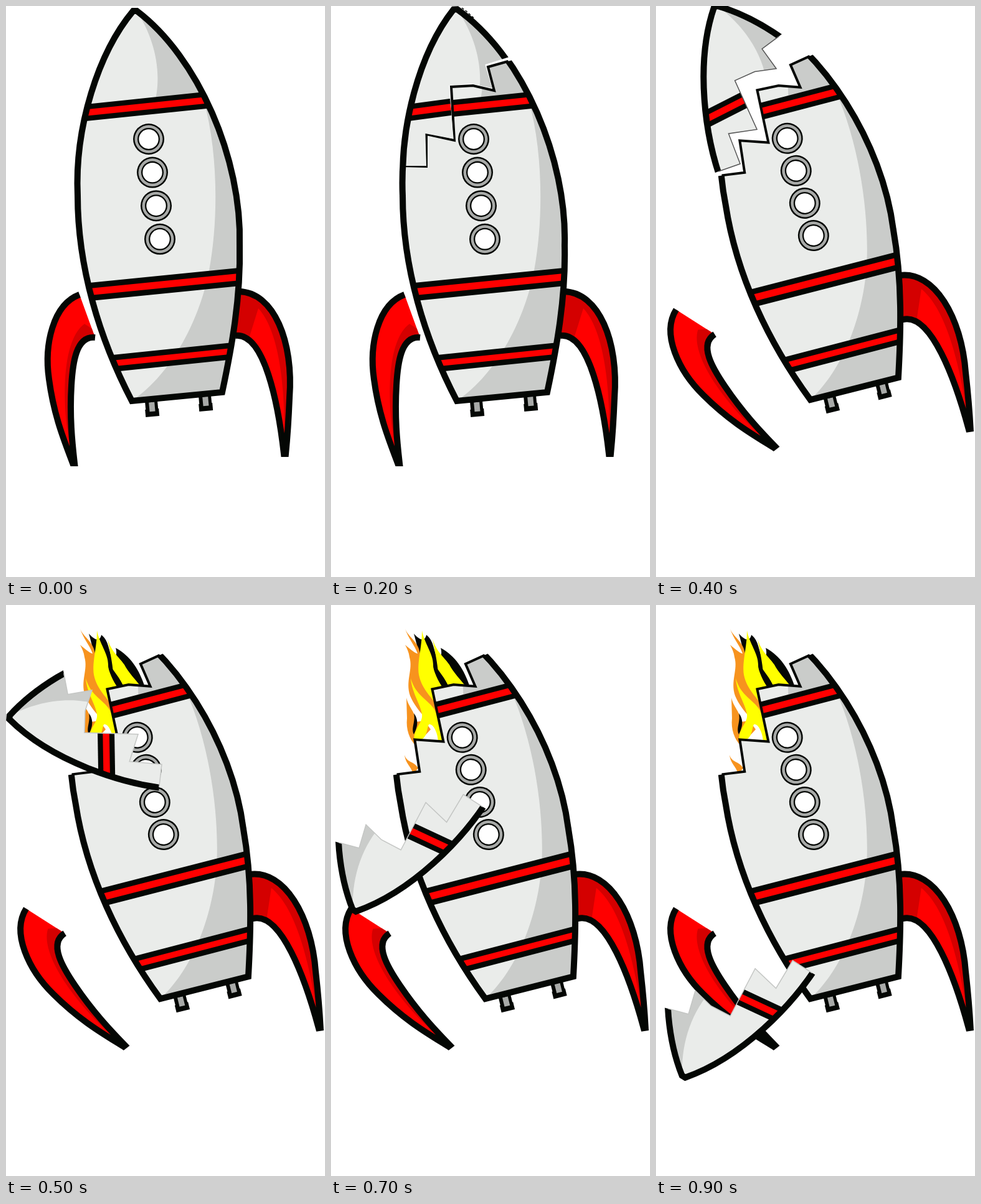
These frames come from a looping animation (512x918 px, 1000 ms). An HTML page with a canvas:

```html
<!DOCTYPE html>
<html lang="en">
<head>
<meta charset="utf-8">
<title>Rocket breaking apart</title>
<style>
html, body { margin: 0; width: 100%; height: 100%; overflow: hidden; background: #fff; }
canvas { display: block; width: 100vw; height: 100vh; }
</style>
</head>
<body>
<canvas id="stage" width="512" height="918"></canvas>
<script>
const ctx = document.getElementById('stage').getContext('2d');
const INK = '#040704', LIGHT = '#eaecea', SHADE = '#caccca';
const RED = '#ff0000', DARK_RED = '#d40000', GREY = '#a8aaa8';
const YELLOW = '#ffff00', ORANGE = '#f7931e';

const hull = new Path2D('M204 8C148 75 110 195 115 305C115 420 150 535 202 635L347 621C362 550 377 470 375 385C379 245 308 82 210 8Z');
const noseShade = new Path2D('M207 4C235 45 252 100 239 155L335 155L300 60Z');
const bodyShade = new Path2D('M317 150C342 240 340 350 326 425C312 500 268 590 203 634L347 622L400 520L400 300Z');

const rightFin = new Path2D('M374 459C430 460 462 540 455 630Q453 680 449 720L446 720C437 640 415 525 368 530');
const rightGlow = new Path2D('M405 486C436 520 448 600 447 700C430 610 415 550 391 531Z');
const leftFin = new Path2D('M118 464C75 480 61 545 69 600C77 660 94 700 107 735L110 735C106 700 102 660 105 610C107 575 112 530 143 533');
const leftShade = new Path2D('M140 520L126 511C92 535 88 625 102 704L110 700L110 560L143 533Z');

// Torn edge, right to left, shared by the nose and the body
const crack = [[291, 87], [252, 98], [262, 136], [228, 128], [193, 130], [198, 216], [153, 206], [153, 258], [116, 257]];
const tear = poly(crack);
const noseSide = poly([[340, 72], ...crack, [60, 257], [60, -40], [340, -40]]);
const bodySide = poly([[340, 72], ...crack, [60, 257], [60, 760], [500, 760], [500, 72]]);

const flames = [
  [INK, 'M133 46C147 62 152 54 153 48C166 58 164 74 172 88C178 82 178 76 176 69C200 82 214 104 223 132L190 150L160 110L143 84Z'],
  [ORANGE, 'M119 38C124 52 140 58 143 78C148 100 160 120 180 150L180 205C160 190 138 172 127 146C119 122 132 104 126 84C125 76 122 70 119 64C128 72 136 78 139 78C134 64 124 54 119 38Z'],
  [ORANGE, 'M121 149C124 164 136 172 136 188L150 186L160 200L136 226C126 216 120 200 122 182Z'],
  [ORANGE, 'M118 241C122 254 132 250 140 262L132 272C128 258 120 256 118 241Z'],
  [YELLOW, 'M146 41C150 62 164 78 164 96C164 112 178 122 182 136L176 170C166 152 146 138 141 112C138 90 146 70 146 41Z'],
  [YELLOW, 'M163 55C170 76 180 82 190 96C196 108 208 120 218 133L170 140C176 118 170 90 163 55Z'],
  [YELLOW, 'M134 220C130 200 148 190 146 176C144 160 130 142 128 118C136 146 156 152 166 168C174 184 181 200 181 222L172 222C172 206 164 190 157 192C152 204 156 216 134 220Z'],
  [INK, 'M164 92C172 106 184 118 190 134L180 134C172 122 164 108 164 92Z'],
  [INK, 'M133 174C142 186 138 198 133 208C128 198 136 188 133 174Z']
].map(([color, d]) => [color, new Path2D(d)]);

// Each pose is [degrees, x, y] with a fixed pivot per part
const PIVOT = { body: [238, 294.5], fin: [109, 738], nose: [119, 257] };
const bodyPose = [[0, 238, 294.5], [-2.1, 232.7, 295], [-8.7, 231.8, 291]];
const finPose = [[0, 109, 738], [-19.6, 154, 731], [-37.5, 192, 711]];
const nosePose = [
  [0, 119, 257], [0, 119, 257], [-1.7, 119, 257], [-15, 110, 260], [-21, 103, 265],
  [-85, 246, 290], [-149, 243, 221], [-149, 241, 323], [-149, 238, 445], [-149, 248, 590]
];

function poly(points) {
  const p = new Path2D();
  points.forEach(([x, y]) => p.lineTo(x, y));
  return p;
}

function fill(path, color) {
  ctx.fillStyle = color;
  ctx.fill(path);
}

function outline(path, color = INK, width = 10) {
  ctx.strokeStyle = color;
  ctx.lineWidth = width;
  ctx.stroke(path);
}

function part(name, [deg, x, y], draw) {
  const [px, py] = PIVOT[name];
  ctx.save();
  ctx.translate(x, y);
  ctx.rotate(deg * Math.PI / 180);
  ctx.translate(-px, -py);
  draw();
  ctx.restore();
}

function clipped(path, draw) {
  ctx.save();
  ctx.clip(path);
  draw();
  ctx.restore();
}

function band(x1, y1, x2, y2, height, core) {
  const line = poly([[x1, y1], [x2, y2]]);
  outline(line, INK, height);
  outline(line, RED, core);
}

function disc(x, y, r, color) {
  ctx.fillStyle = color;
  ctx.beginPath();
  ctx.arc(x, y, r, 0, Math.PI * 2);
  ctx.fill();
}

function porthole(x, y) {
  disc(x, y, 25, INK);
  disc(x, y, 22.5, GREY);
  disc(x, y, 18, INK);
  disc(x, y, 15.7, '#fff');
}

function nozzle(x, y) {
  ctx.save();
  ctx.translate(x, y);
  ctx.rotate(-0.09);
  ctx.fillStyle = INK;
  ctx.fillRect(-10, -12, 20, 18);
  ctx.fillRect(-11, 2, 22, 12);
  ctx.fillStyle = GREY;
  ctx.fillRect(-4, -9, 9, 15);
  ctx.restore();
}

function drawHull() {
  clipped(hull, () => {
    fill(hull, LIGHT);
    fill(noseShade, SHADE);
    fill(bodyShade, SHADE);
    band(120, 172.4, 335, 150, 27, 10.5);
    band(120, 461, 390, 434, 29, 11);
    band(160, 575.8, 375, 553.5, 27, 9.5);
  });
  outline(hull);
  for (let i = 0; i < 4; i++) porthole(229 + i * 6, 214 + i * 53.6);
}

function drawBase() {
  fill(rightFin, DARK_RED);
  fill(rightGlow, RED);
  outline(rightFin);
  nozzle(234, 646);
  nozzle(320, 637);
}

function drawFin() {
  fill(leftFin, RED);
  clipped(leftFin, () => fill(leftShade, DARK_RED));
  outline(leftFin);
}

function drawTear(color, width) {
  clipped(hull, () => outline(tear, color, width));
}

function render(step) {
  const stage = Math.max(0, Math.min(step, 4) - 2);
  const broken = step > 0;
  ctx.fillStyle = '#fff';
  ctx.fillRect(0, 0, 512, 918);

  if (step > 4) flames.forEach(([color, path]) => fill(path, color));
  part('fin', finPose[stage], drawFin);

  part('body', bodyPose[stage], () => {
    drawBase();
    if (!broken) return drawHull();
    clipped(bodySide, drawHull);
    drawTear(INK, 4);
  });

  if (broken) part('nose', nosePose[step], () => {
    clipped(noseSide, drawHull);
    if (step > 2) drawTear(step > 4 ? '#c4c6c4' : '#555', 1.5);
  });

  // Loose specks where the tip has just shifted
  if (step === 2) {
    ctx.setLineDash([4, 3]);
    outline(poly([[210, 3], [218, 9], [231, 21]]), INK, 1.5);
    ctx.setLineDash([]);
  }
}

function tick() {
  render(Math.floor(performance.now() % 1000 / 100));
  requestAnimationFrame(tick);
}
tick();
</script>
</body>
</html>
```
